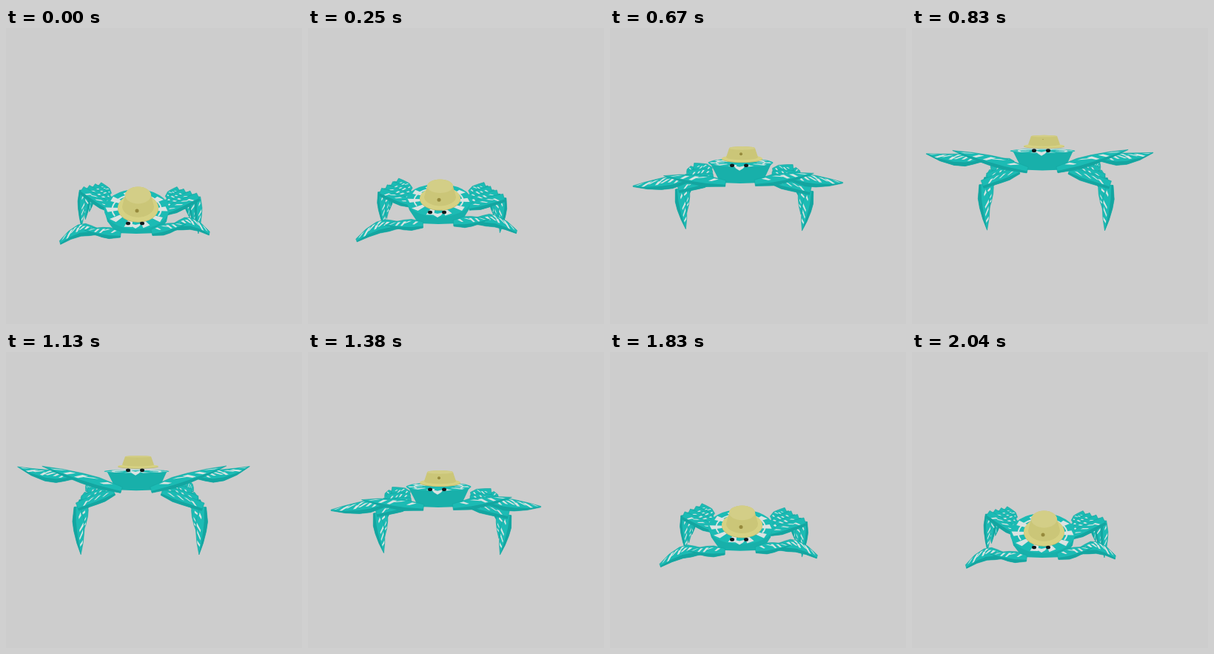
An HTML page with a canvas that plays this animation: 400 by 400 pixels, repeating every 2080 ms.

```html
<!DOCTYPE html>
<html>
<head>
<meta charset="utf-8">
<style>
html, body { margin: 0; height: 100%; overflow: hidden; background: #cdcdcd; }
canvas { display: block; width: 100vw; height: 100vh; }
</style>
</head>
<body>
<canvas id="stage" width="400" height="400"></canvas>
<script>
const g = document.getElementById('stage').getContext('2d');
const TEAL = '#1cbbb4', SHADE = '#14a5a0', WHITE = '#dbe3e2';
const LOOP = 2080, LAST = 49, CX = 176.5, MID = .45;

// Each joint of the left side: crouched, half way up, raised.
const claw = {
  shoulder: [[155, 279], [156, 237], [156, 184]],
  elbow: [[106, 273], [92, 239], [46, 149]],
  tip: [[73, 290], [48, 261], [14, 148]]
};
const frontLeg = {
  hip: [[143, 246], [138, 222], [147, 188]],
  knee: [[102, 219], [92, 222], [97, 208]],
  foot: [[102, 269], [103, 270], [101, 274]]
};
const backLeg = {
  hip: [[140, 226], [138, 205], [138, 180]],
  knee: [[125, 213], [113, 197], [118, 180]],
  foot: [[118, 238], [108, 222], [108, 186]]
};

const mix = (a, b, t) => a.map((v, i) => v + (b[i] - v) * t);

// Parabola through the three places of a joint.
const bow = ([low, mid, high], s) => low.map((v, i) => {
  const rise = high[i] - v;
  return v + rise * s + (mid[i] - v - rise * MID) / (MID - MID * MID) * s * (1 - s);
});

function random(seed) {
  return () => (seed = (seed * 16807 + 11) % 2147483647) / 2147483647;
}

function poly(points, fill) {
  g.beginPath();
  points.forEach(p => g.lineTo(...p));
  g.closePath();
  g.fillStyle = fill;
  g.fill();
}

function oval(x, y, rx, ry, fill) {
  g.beginPath();
  g.ellipse(x, y, rx, ry, 0, 0, 7);
  g.fillStyle = fill;
  g.fill();
}

// Tapered bone from a to b, arched upwards by lift, with seeded white streaks.
function bone(a, b, width, end, lift, seed, marks) {
  const dx = b[0] - a[0], dy = b[1] - a[1], len = Math.hypot(dx, dy) || 1;
  const flip = dx < 0 ? -1 : 1;
  const at = (u, v) => {
    const w = u < .3 ? width * (.55 + u * 1.5) : width + (end - width) * ((u - .3) / .7) ** 1.8;
    const arch = lift * Math.sin(Math.PI * Math.min(1, u));
    return [a[0] + dx * u - dy / len * w * v * flip, a[1] + dy * u + dx / len * w * v * flip - arch];
  };
  const stops = [0, .15, .3, .5, .75, 1];
  const edge = v => stops.map(u => at(u, v));
  poly([...edge(-1), ...edge(1).reverse()], TEAL);
  g.lineWidth = .6;
  g.strokeStyle = SHADE;
  g.stroke();
  poly([...edge(.4), ...edge(1).reverse()], SHADE);

  const next = random(seed);
  for (let i = 0; i < marks; i++) {
    const u = .12 + .72 * i / marks + .04 * next(), v = -.9 + .5 * next();
    const long = .08 + .1 * next(), lean = .3 + .7 * next();
    poly([at(u, v), at(u + .07, v), at(u + long + .05, v + lean), at(u + long, v + lean)], WHITE);
  }
}

// The view is turned a little: the right side is mirrored, scaled and tipped.
const place = (p, right, scale, tip) => {
  const d = CX - p[0];
  return right ? [CX + d * scale, p[1] - d * tip] : p;
};

function leg(i, right, s) {
  const [hip, knee, foot] = ['hip', 'knee', 'foot'].map(j =>
    place(mix(bow(backLeg[j], s), bow(frontLeg[j], s), i / 3), right, 1.12, -.12 * (1 - s)));
  bone(knee, foot, 5 + 3 * s, 0, 0, 31 + i, 4);
  bone(hip, knee, 7, 5.5, 0, 57 + i, 4);
}

function pincer(right, s) {
  const [shoulder, elbow, tip] = ['shoulder', 'elbow', 'tip'].map(j =>
    place(bow(claw[j], s), right, .95, .12 * (1 - s)));
  bone(mix(shoulder, elbow, .6), tip, 8.5, 2.5 * (1 - s), 9 - 15 * s, 91, 9);
  bone(shoulder, elbow, 7.5, 0, 0, 17, 5);
}

function body(s, tilt) {
  const y = 245 - 86 * s, ry = 45 * tilt, bottom = 278 - 93 * s;
  const low = y + ry * .6;
  poly([[132.5, y], [137, low], [149, bottom - 1], [176, bottom],
    [206, bottom - 1], [217, low], [220.5, y]], '#18b0aa');
  oval(CX, y, 44, ry, TEAL);
  const spot = (r, a) => [CX + 44 * r * Math.cos(a), y + ry * r * Math.sin(a)];
  for (let i = 0; i < 10; i++) {
    const a = i * Math.PI / 5;
    poly([spot(.5, a - .08), spot(.9, a - .16), spot(.96, a + .1), spot(.5, a + .14)], WHITE);
  }
  g.beginPath();
  g.ellipse(CX, y, 33, ry * .75, 0, Math.PI * .85, Math.PI * 2.15);
  g.strokeStyle = WHITE;
  g.lineWidth = 2 - s;
  g.stroke();
}

function hat(s, tilt) {
  const x = 178.5, brim = 243 - 91 * s, crown = 226 - 87 * s;
  oval(x, brim + .8, 27.5, 30 * tilt + 1, '#bdb86e');
  oval(x, brim, 27.5, 30 * tilt + 1, '#d6d183');
  g.beginPath();
  g.ellipse(x, brim - 2, 21.5, 23 * tilt + 1, 0, 0, Math.PI);
  g.ellipse(x, crown, 17.5, 19 * tilt, 0, Math.PI, 2 * Math.PI);
  g.closePath();
  g.fillStyle = '#cbc678';
  g.fill();
  oval(x, crown, 17.5, 19 * tilt, '#d3ce87');
  const r = 2.5 * Math.min(1, 3 * (1 - s));
  oval(177, 247 - 105 * s, r, r, '#968a3c');
}

function face(s) {
  const y = 264 - 107 * s;
  poly([[167, y], [175, y + 2], [183, y], [180, y + 4], [175, y + 7], [170, y + 4]], WHITE);
  for (const x of [165, 184]) oval(x, y, 3, 2.3, '#10181a');
}

function draw(time) {
  const step = Math.min(LAST, Math.floor((time % LOOP + 4) * .024));
  const s = (1 - Math.cos(2 * Math.PI * step / LAST)) / 2;
  const tilt = .05 + .55 * (1 - s) ** 1.5;
  g.fillStyle = '#cdcdcd';
  g.fillRect(0, 0, 400, 400);
  for (const right of [false, true])
    for (let i = 0; i < 4; i++) leg(i, right, s);
  body(s, tilt);
  hat(s, tilt);
  face(s);
  pincer(false, s);
  pincer(true, s);
}

const start = performance.now();
function tick() {
  draw(performance.now() - start);
  requestAnimationFrame(tick);
}
tick();
</script>
</body>
</html>
```
